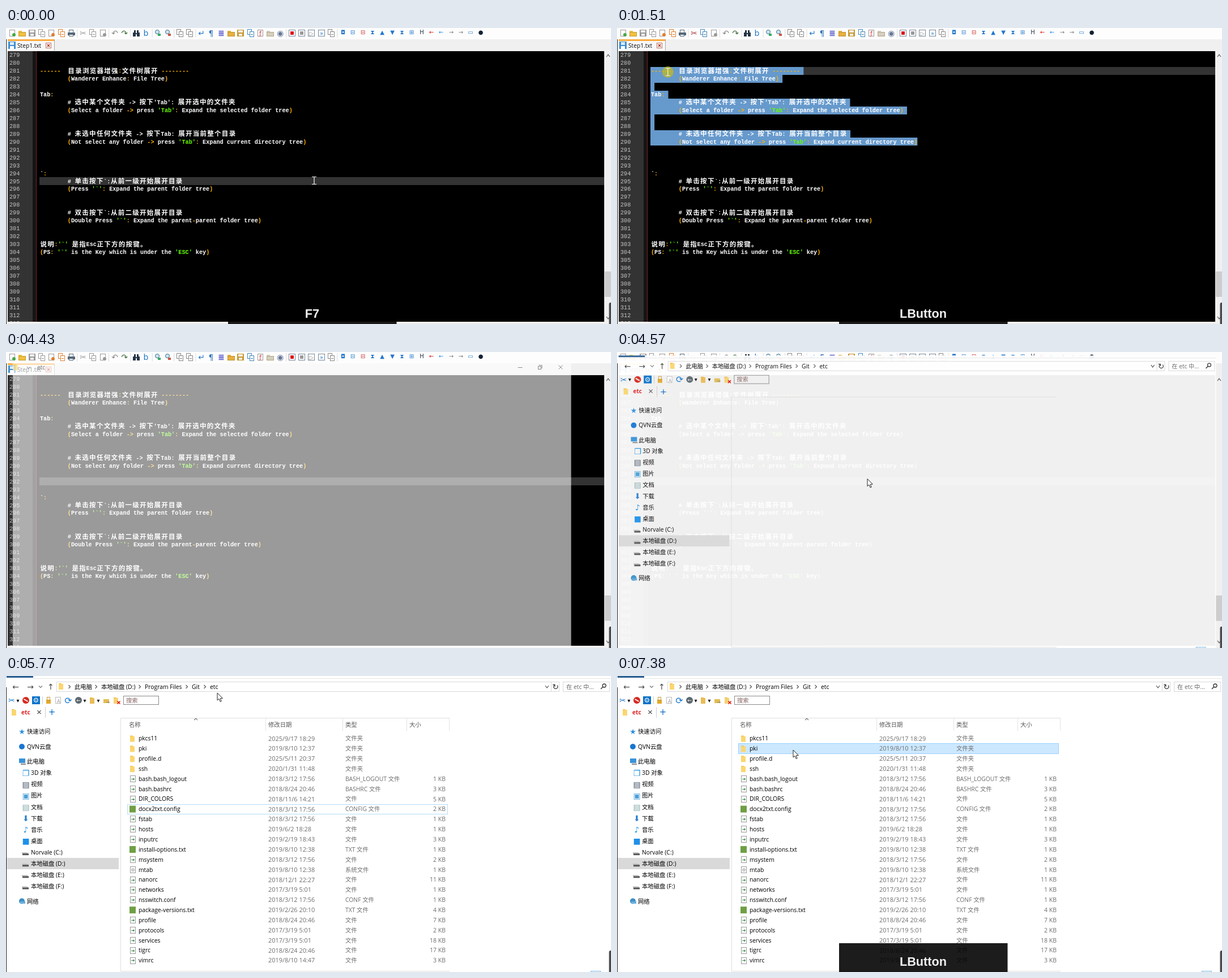
An HTML page with a canvas for the animation above (8000 ms loop, 1068 px wide and 524 px high).

```html
<!DOCTYPE html>
<html lang="zh">
<head>
<meta charset="utf-8">
<style>
html, body { margin: 0; width: 100%; height: 100%; overflow: hidden; background: #fff; }
canvas { display: block; }
</style>
</head>
<body>
<canvas id="stage" width="1068" height="524"></canvas>
<script>
const c = document.getElementById('stage').getContext('2d');
const UI = "'Open Sans','Noto Sans CJK SC','Noto Sans CJK',sans-serif";
const MONO = "'Liberation Mono','Noto Sans CJK SC','Noto Sans CJK',monospace";
const SYM = "'DejaVu Sans',sans-serif";
const COL = 6.108, CJK = 12.77, TOP = 47.5, PITCH = 13.96, LEFT = 60;

function rect(x, y, w, h, fill) { c.fillStyle = fill; c.fillRect(x, y, w, h); }
function frame(x, y, w, h, stroke) { c.strokeStyle = stroke; c.lineWidth = 1; c.strokeRect(x + .5, y + .5, w - 1, h - 1); }
function dot(x, y, r, fill) { c.fillStyle = fill; c.beginPath(); c.arc(x, y, r, 0, 7); c.fill(); }
function ring(x, y, r, stroke, width) { c.strokeStyle = stroke; c.lineWidth = width; c.beginPath(); c.arc(x, y, r, 0, 7); c.stroke(); }
function line(points, stroke, width = 1) {
  c.strokeStyle = stroke; c.lineWidth = width; c.beginPath();
  for (let i = 0; i < points.length; i += 2) c.lineTo(points[i], points[i + 1]);
  c.stroke();
}
function text(s, x, y, fill = '#000', size = 10.35, font = UI, align = 'left', weight = '') {
  c.font = `${weight} ${size}px ${font}`;
  c.fillStyle = fill; c.textAlign = align;
  c.fillText(s, x, y + size * .36);
}
const glyph = (s, x, y, fill, size = 13) => text(s, x, y, fill, size, SYM, 'center');
function cross(x, y, r, stroke, width = 1) {
  line([x - r, y - r, x + r, y + r], stroke, width); line([x - r, y + r, x + r, y - r], stroke, width);
}
function folder(x, y, fill = '#fbd66f') { rect(x - 4, y - 5, 5, 3, '#e9b93f'); rect(x - 4, y - 4, 8, 10, fill); }
function sheet(x, y, border = '#999', w = 10, h = 12) { rect(x - w / 2, y - h / 2, w, h, '#fff'); frame(x - w / 2, y - h / 2, w, h, border); }
function chevron(x, y, dx, dy, stroke = '#555') {
  line(dx ? [x - dx, y - 3, x + dx, y, x - dx, y + 3] : [x - 3, y - dy, x, y + dy, x + 3, y - dy], stroke, 1.2);
}

// ---------- text editor ----------
const doc = {
  281: '------  目录浏览器增强:文件树展开 --------',
  282: '\t(Wanderer Enhance: File Tree)',
  284: 'Tab:',
  285: "\t# 选中某个文件夹 -> 按下'Tab': 展开选中的文件夹",
  286: "\t(Select a folder -> press 'Tab': Expand the selected folder tree)",
  289: '\t# 未选中任何文件夹 -> 按下Tab: 展开当前整个目录',
  290: "\t(Not select any folder -> press 'Tab': Expand current directory tree)",
  294: '`:',
  295: '\t# 单击按下`:从前一级开始展开目录',
  296: "\t(Press '`': Expand the parent folder tree)",
  299: '\t# 双击按下`:从前二级开始展开目录',
  300: "\t(Double Press '`': Expand the parent-parent folder tree)",
  303: "说明:'`' 是指Esc正下方的按键。",
  304: "(PS: '`' is the Key which is under the 'ESC' key)"
};
const isCJK = s => /[\u3000-\u9fff]/.test(s);
const lineY = n => TOP + (n - 279) * PITCH;
const lineTop = n => Math.round(lineY(n) - 6.6);
function lineEnd(n) {
  let x = LEFT;
  for (const ch of doc[n] || '') x += ch === '\t' ? 8 * COL : isCJK(ch) ? CJK : COL;
  return x;
}
function codeLine(n) {
  const src = doc[n].replace('\t', '        ');
  const comment = src.trim()[0] === '#';
  const runs = src.match(comment ? /[\u3000-\u9fff]|[^\u3000-\u9fff]+/g
    : /'[^']*'|[-:()>]+|[\u3000-\u9fff]|[^-:()>'\u3000-\u9fff]+/g);
  let x = LEFT;
  for (const run of runs) {
    const wide = isCJK(run);
    const fill = comment || wide ? '#fff' : run[0] === "'" ? '#66ff00' : /[-:()>]/.test(run) ? '#ffb400' : '#fff';
    text(run, x + (wide ? .5 : 0), lineY(n), fill, wide ? 11.5 : COL / .6, MONO, 'left', 'bold');
    x += run.length * (wide ? CJK : COL);
  }
}

// kind + colour: D sheet, P two sheets, F folder, S disk, R and K framed, L binoculars, Z lens,
// otherwise a glyph; "|" separates groups
const tools = `D#4a4 F#f0c040 S#999 P#999 D#e08030 P#e08030 T#567 | ✂#a33 P#48b D#999 | ↶#888 ↷#3a6a3a |
 L#234 b#27c | Z#3a6 Z#c54 | P#888 P#888 | ↵#27c ¶#37b ≣#22b F#e8b040 S#c89830 P#48b Dƒ#d33 F#d4cfc0 ◉#679 |
 R#d11 R#999 K▷#888 K»#27c P#888 | ◘#27c ⊟#27c ⊟#c33 ⧗#27c ▲#27c ▼#27c ⧗#27c ⊞#27c H#234 ←#d11 ←#28e →#777 →#777 ▭#27c ●#123`.split(/\s+/);
const icons = {
  D(x, y, fill, mark) {
    sheet(x, y, '#999');
    if (mark) glyph(mark, x, y, fill, 11); else dot(x + 3, y + 3, 3, fill);
  },
  P(x, y, fill) { sheet(x - 2, y - 2, fill, 8, 10); sheet(x + 2, y + 2, fill, 8, 10); line([x, y + 2.5, x + 4, y + 2.5], fill); },
  F(x, y, fill) { rect(x - 6, y - 4, 6, 3, fill); rect(x - 6, y - 2, 13, 8, fill); frame(x - 6, y - 2, 13, 8, 'rgba(120,90,20,.35)'); },
  S(x, y, fill) { rect(x - 6, y - 6, 12, 12, fill); rect(x - 4, y - 5, 8, 4, '#f2f2f2'); rect(x - 3, y + 1, 6, 4, '#eee'); },
  T(x, y, fill) { sheet(x, y - 3, fill, 8, 6); rect(x - 6, y - 1, 13, 5, fill); sheet(x, y + 4, fill, 8, 4); },
  R(x, y, fill) { sheet(x, y, '#789', 12, 12); rect(x - 3, y - 3, 6, 6, fill); },
  K(x, y, fill, mark) { sheet(x, y, '#789', 12, 12); glyph(mark, x, y, fill, 10); },
  L(x, y, fill) { rect(x - 6, y - 1, 5, 7, fill); rect(x + 1, y - 1, 5, 7, fill); rect(x - 4, y - 5, 3, 4, fill); rect(x + 1, y - 5, 3, 4, fill); rect(x - 2, y, 4, 2, fill); },
  Z(x, y, fill) { dot(x - 1, y - 2, 4, '#cfe4f2'); ring(x - 1, y - 2, 3.5, '#478', 1); rect(x, y + 1, 5, 4, fill); }
};
function toolbar(hasSelection) {
  rect(0, 0, 1068, 20, '#fdfdfd');
  let x = 11, index = 0;
  for (const tool of tools) {
    if (tool === '|') { line([x - 6.5, 2, x - 6.5, 17], '#ddd'); x += 3.7; continue; }
    let [shape, fill] = tool.split('#');
    const disabled = (index === 7 || index === 8) && !hasSelection;
    fill = disabled ? '#999' : '#' + fill;
    const small = x > 590, px = Math.round(x), y = small ? 7 : 9;
    if (icons[shape[0]]) icons[shape[0]](px, y, fill, shape[1]);
    else glyph(shape, px, y, fill, small ? 10 : 14);
    x += 17.33; index++;
  }
}

function editor(t, head, hasSelection, current, caret) {
  rect(0, 0, 1068, 524, '#f0f0f0');
  toolbar(hasSelection);
  rect(3, 20, 82, 20, '#f8f8f8'); rect(3, 20, 82, 3, '#faaa3c'); line([85.5, 20, 85.5, 40], '#aaa');
  rect(4, 24, 13, 13, '#3f8fd0'); rect(7, 25, 7, 5, '#d8ebfa'); rect(7, 32, 7, 5, '#fff');
  text('Step1.txt', 20, 31, '#111', 10.2);
  frame(70, 26, 10, 10, '#c0705a'); cross(75, 31, 2.2, '#b03020', 1.3);

  c.save();
  c.beginPath(); c.rect(0, 41, 1068, 479); c.clip();
  rect(3, 41, 1053, 480, '#000');
  rect(3, 41, 44, 480, '#333'); rect(47, 41, 6, 480, '#141414'); rect(53, 41, 1, 480, '#7a2424');
  rect(59, lineTop(current), 997, 14, '#333');
  if (hasSelection) for (let n = head.line; n <= 290; n++) {
    const from = n === head.line ? head.x : 59;
    rect(from, lineTop(n), lineEnd(n) + (n < 290 ? COL : 0) - from, 14, '#6699cc');
  }
  for (let n = 279; n <= 313; n++) {
    text(n, 6, lineY(n), '#c4c4c4', COL / .6, MONO);
    if (doc[n]) codeLine(n);
  }
  if (caret) rect(caret, lineTop(current), 1, 14, '#fff');
  c.restore();

  rect(1056, 41, 12, 480, '#f0f0f0'); rect(1057, 431, 11, 45, '#cdcdcd');
  chevron(1063, 49, 0, -2); chevron(1063, 513, 0, 2);
  rect(0, 20, 1, 504, '#222');
}

// ---------- file window ----------
const rowY = i => 110.6 + i * 17.86;
const files = `pkcs11|2025/9/17 18:29|文件夹
pki|2019/8/10 12:37|文件夹
profile.d|2025/5/11 20:37|文件夹
ssh|2020/1/31 11:48|文件夹
bash.bash_logout|2018/3/12 17:56|BASH_LOGOUT 文件|1
bash.bashrc|2018/8/24 20:46|BASHRC 文件|3
DIR_COLORS|2018/11/6 14:21|文件|5
docx2txt.config|2018/3/12 17:56|CONFIG 文件|2
fstab|2018/3/12 17:56|文件|1
hosts|2019/6/2 18:28|文件|1
inputrc|2019/2/19 18:43|文件|3
install-options.txt|2019/8/10 12:38|TXT 文件|1
msystem|2018/3/12 17:56|文件|2
mtab|2019/8/10 12:38|系统文件|1
nanorc|2018/12/1 22:27|文件|11
networks|2017/3/19 5:01|文件|1
nsswitch.conf|2018/3/12 17:56|CONF 文件|1
package-versions.txt|2019/2/26 20:10|TXT 文件|4
profile|2018/8/24 20:46|文件|7
protocols|2017/3/19 5:01|文件|2
services|2017/3/19 5:01|文件|18
tigrc|2018/8/24 20:46|文件|17
vimrc|2019/8/10 14:47|文件|3`.split('\n').map(s => s.split('|'));

const places = [['3D 对象', '❒', '#1e90d8'], ['视频', '▤', '#456'], ['图片', '▣', '#4a9fd8'], ['文档', '▤', '#8aa'],
  ['下载', '⬇', '#2a7fd0'], ['音乐', '♪', '#1e8fe0'], ['桌面', '■', '#1e90e8'],
  ['Norvale (C:)'], ['本地磁盘 (D:)'], ['本地磁盘 (E:)'], ['本地磁盘 (F:)']];

function chrome() {
  rect(0, 0, 1068, 524, '#fff');
  rect(1, 4, 1067, 1, '#e6e6e6'); rect(1, 0, 47, 3, '#2b5f93');
  glyph('←', 17, 19, '#444', 14); glyph('→', 43, 19, '#444', 14); glyph('↑', 79, 19, '#444', 14);
  chevron(61, 19, 0, 1.5, '#777');
  frame(89, 10, 888, 18, '#d9d9d9'); line([962.5, 10, 962.5, 28], '#d9d9d9');
  folder(97, 18);
  [['此电脑', 121], ['本地磁盘 (D:)', 168], ['Program Files', 245], ['Git', 328], ['etc', 360]]
    .forEach(([s, x]) => { text(s, x, 19); chevron(x - 9, 19, 1.5, 0); });
  chevron(955, 19, 0, 2); glyph('↻', 970, 19, '#333', 14);
  frame(983, 10, 83, 18, '#d9d9d9'); text('在 etc 中...', 989, 19, '#666');
  ring(1056, 17, 3, '#333', 1.3); line([1054, 19, 1050, 23], '#333', 1.5);

  glyph('✂', 10, 43, '#1878c8', 14);
  dot(35, 43, 6, '#d62a20'); line([31.5, 41, 38.5, 45], '#fff', 2);
  rect(46, 36, 14, 14, '#0a72c8'); glyph('⚙', 53, 43, '#fff', 12);
  line([64.5, 36, 64.5, 50], '#ccc');
  rect(71, 42, 8, 7, '#e2a92c'); frame(72, 37, 6, 7, '#c99a35');
  sheet(92, 43, '#bbb'); text('A', 90, 45, '#999', 9);
  glyph('⟳', 110, 43, '#1676d0', 16);
  dot(128, 43, 6, '#5e6870'); glyph('←', 128, 43, '#fff', 9);
  folder(152, 43, '#e9bc56'); rect(172, 41, 10, 7, '#e2bd55'); glyph('→', 180, 46, '#777', 8);
  folder(194, 43, '#f5d272'); cross(199, 47, 2.5, '#d11', 1.6);
  for (const x of [21, 139, 163]) glyph('▾', x, 43, '#111', 10);
  frame(207, 35, 63, 16, '#8a8a8a'); text('搜索', 212, 43, '#866');
  folder(14, 64); text('etc', 27, 64, '#e02020', 10.2, UI, 'left', 'bold');
  cross(58.5, 64, 3, '#555', 1.2); line([69.5, 55, 69.5, 74], '#ccc'); glyph('+', 81, 64, '#0a6cc8', 15);

  rect(1, 322, 198, 20, '#d9d9d9');
  glyph('★', 28, 98, '#2a8fe0', 13); text('快速访问', 37, 98);
  dot(28, 125, 5, '#1976d2'); text('QVN云盘', 37, 125);
  rect(23, 146, 11, 8, '#3a93d8'); rect(26, 155, 9, 2, '#888'); text('此电脑', 37, 151.5);
  places.forEach(([name, icon, fill], i) => {
    const y = 171.5 + i * 20.1;
    text(name, 44, y);
    if (icon) glyph(icon, 35, y, fill, 14);
    else { line([28, y + 1, 37, y + 1, 40, y + 4], '#bbb', 2); rect(29, y + 2, 11, 3, '#555'); }
  });
  dot(28, 398.5, 5, '#3d8fc6'); rect(25, 399, 9, 4, '#6aaedb'); text('网络', 37, 399);

  line([783, 74.5, 202.5, 74.5, 202.5, 522.5, 783, 522.5], '#dedede');
  frame(1032, 522, 18, 4, '#7ab5dc');
}

function fileList(t, tip) {
  if (t > 5200 && tip.y > 75 && tip.y < 98 && tip.x < 458) rect(203, 75, 255, 22, '#d9ebf9');
  for (const x of [458, 594, 707, 782]) rect(x, 75, 1, 22, '#e3e3e3');
  [['名称', 217], ['修改日期', 463], ['类型', 599], ['大小', 712]].forEach(([s, x]) => text(s, x, 86, '#555'));
  chevron(335, 76.5, 0, -1.5, '#777');

  const hover = t > 5040 ? Math.round((tip.y - rowY(0)) / 17.86) : -1;
  files.forEach(([name, date, type, size], i) => {
    const y = rowY(i), top = Math.round(y - 9);
    const picked = i === 1 && t >= 7000;
    if (picked) { rect(214, top, 566, 19, '#cce8ff'); frame(214, top, 566, 19, '#99d1ff'); }
    else if (i === 7 && t < 5040) rect(214, top, 566, 18, '#d8eaf9');
    else if (i === hover) rect(214, top, 566, 18, '#e5f3ff');
    if (i === 7 && t >= 5040 && t < 7000) frame(214, top, 566, 18, '#b5dcf5');

    if (!size) folder(223, y);
    else if (/txt/.test(name)) rect(218, y - 6, 11, 12, '#6f9f45');
    else {
      sheet(224, Math.round(y));
      glyph(name === 'mtab' ? '⚙' : '➜', 224, y, name === 'mtab' ? '#888' : '#2a8a3a', 8);
    }
    text(name, 234, y);
    text(date, 463, y, '#6d6d6d', 10.9);
    text(type, 599, y, '#6d6d6d');
    if (size) text(size + ' KB', 776, y, '#6d6d6d', 10.5, UI, 'right');
  });
}

// Opening window: grows from a smaller translucent sheet to the whole stage
function fileWindow(t, tip) {
  const u = Math.min(1, (t - 4430) / 230), e = 1 - (1 - u) ** 2;
  c.save();
  c.globalAlpha = .6 + .4 * e;
  const x = 12 * (1 - e), y = 18 - 48 * e, right = 997 + 71 * e;
  if (t > 4570) {
    const k = (right - x) / 1068;
    c.translate(x, 41 * (1 - e)); c.scale(k, k);
    chrome();
    if (t > 4640) fileList(t, tip);
  } else {
    rect(x, y, right - x, 524 - y, '#fff');
    folder(x + 5, y + 9); chevron(x + 28, y + 10, 0, 1.5);
    text('etc', x + 43, y + 10, '#111');
    const ink = '#444', by = Math.round(y + 9);
    line([right - 94, by + .5, right - 86, by + .5], ink);
    frame(Math.round(right - 59), by - 2, 6, 6, ink);
    line([right - 57, by - 3.5, right - 51.5, by - 3.5, right - 51.5, by + 2], ink);
    cross(right - 18.5, by, 3.5, ink);
  }
  c.restore();
  rect(0, 20, 1, 504, '#222');
}

// ---------- pointer and key caption ----------
const path = [[0, 544, 270], [260, 544, 270], [540, 577, 195], [680, 577, 195], [1430, 112, 84], [1510, 90, 78],
  [1700, 54, 58], [1850, 55, 70], [2290, 58, 53], [2830, 458, 225], [4500, 458, 225], [4970, 352, 222],
  [5200, 346, 217], [5770, 373, 30], [6000, 380, 21], [6150, 378, 11], [6560, 322, 164], [6860, 314, 135], [7000, 311, 131], [8000, 311, 131]];
function pointerAt(t) {
  const i = path.findIndex(p => p[0] > t), [t0, x0, y0] = path[i - 1], [t1, x1, y1] = path[i];
  const k = (t - t0) / (t1 - t0);
  return { x: x0 + (x1 - x0) * k, y: y0 + (y1 - y0) * k };
}
function beam({ x, y }, pressed) {
  if (pressed) dot(x, y, 10, 'rgba(200,190,10,.68)');
  line([x - 4, y - 6.5, x + 4, y - 6.5], '#eee'); line([x - 4, y + 6.5, x + 4, y + 6.5], '#eee');
  line([x, y - 6.5, x, y + 6.5], '#eee', 1.3);
}
function arrow({ x, y }) {
  c.beginPath();
  for (const [dx, dy] of [[0, 0], [0, 13], [3, 10.5], [5.2, 15.5], [7.2, 14.6], [5.2, 9.8], [9.3, 9.5]]) c.lineTo(x + dx, y + dy);
  c.closePath();
  c.fillStyle = '#fff'; c.fill();
  c.strokeStyle = '#222'; c.lineWidth = 1; c.stroke();
}
function caption(t) {
  if (!(t < 2250 || (t >= 3160 && t < 4230) || t >= 6990)) return;
  rect(392, 473, 297.5, 51, 'rgba(0,0,0,.89)');
  const label = t < 690 ? 'F7' : t < 2250 || (t >= 3225 && t < 4230) || t >= 7060 ? 'LButton' : '';
  text(label, 540.5, 505.2, '#f0f0f0', 21.7, "'Liberation Sans',sans-serif", 'center', 'bold');
}

function draw(t) {
  const tip = pointerAt(t);
  if (t < 4700) {
    const selecting = t >= 690 && t < 3225;
    const drag = pointerAt(Math.min(t, 1850));
    const row = Math.max(280, Math.min(290, Math.round(279 + (drag.y - TOP) / PITCH)));
    const col = Math.round((drag.x - 35 - LEFT) / COL);
    const head = { line: row, x: Math.max(59, Math.min(lineEnd(row), LEFT + col * COL)) };
    const current = t < 690 ? 295 : selecting ? row : 292;
    const caret = t >= 400 && t < 690 ? 312 : t >= 3240 && t < 3780 ? 59 : 0;
    editor(t, head, selecting, current, caret);
    if (t < 4430) beam(tip, (t >= 680 && t < 1900) || (t >= 3150 && t < 3300));
  }
  if (t >= 4430) fileWindow(t, tip);
  caption(t);
  if (t >= 4570) arrow(tip);
  c.fillStyle = '#4a4a4a';
  c.beginPath(); c.roundRect(1064.5, 486, 8, 44, 3); c.fill();
}

function tick() {
  draw(performance.now() % 8000);
  requestAnimationFrame(tick);
}
tick();
</script>
</body>
</html>
```
